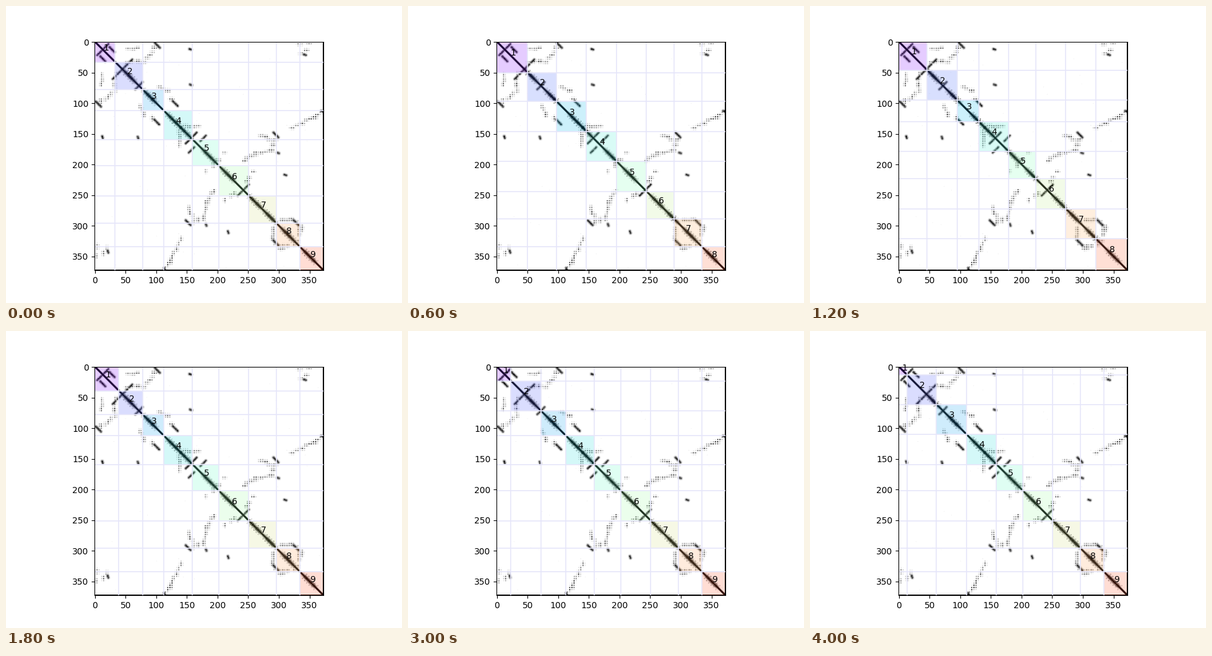
Recreate the animation shown at these times as a matplotlib script. Size 640 by 480 pixels, loop 4200 ms.

```python
import numpy as np
import matplotlib.pyplot as plt
from matplotlib.animation import FuncAnimation
from matplotlib.patches import Rectangle

SIZE = 373
FRAMES = 21
INTERVAL = 200
TAIL = [159, 202, 251, 296, 334]

# Domain boundaries at key steps
KEYS = {
    0: [33, 78, 112, *TAIL],
    3: [50, 97, 146, 195, 244, 289, 334],
    5: [46, 95, 130, 179, 223, 272, 321],
    9: [39, 78, 112, *TAIL],
    12: [26, 74, 112, *TAIL],
    17: [21, 70, 112, *TAIL],
    20: [13, 61, 110, *TAIL],
}

# Hairpins: center on the diagonal, inner and outer reach of the arm
HAIRPINS = [(13, 0, 9), (45, 0, 8), (45, 11, 16), (72, 0, 6),
            (157, 0, 9), (167, 5, 8), (167, 10, 14), (242, 0, 9)]
HELICES = [56, 90, 128, 145, 186, 217, 262, 285, 315, 350]
# Short strands running along the diagonal
PAIRS = [(28, 13), (102, 6), (131, 101), (295, 152), (328, 295)]
SPOTS = [(155, 12), (156, 70), (310, 217), (342, 21), (370, 113), (298, 181)]
# Trails of dotted clumps
TRAILS = [
    [(242, 194), (262, 183), (287, 178), (293, 161), (270, 152)],
    [(321, 140), (337, 134), (350, 126), (369, 114)],
    [(52, 33), (70, 32)],
    [(54, 12), (72, 10)],
    [(82, 32), (97, 9)],
    [(104, 74), (120, 80), (124, 94)],
    [(147, 137), (168, 138)],
    [(201, 193), (211, 182)],
    [(248, 229), (256, 213)],
    [(304, 291), (320, 289), (336, 300), (332, 325)],
    [(335, 4), (349, 3)],
    [(336, 19), (347, 14)],
]


def stroke(x0, y0, x1, y1, width):
    dx, dy = x1 - x0, y1 - y0
    length2 = max(dx * dx + dy * dy, 1e-9)
    t = np.clip(((X - x0) * dx + (Y - y0) * dy) / length2, 0, 1)
    gap = (X - x0 - t * dx) ** 2 + (Y - y0 - t * dy) ** 2
    return np.exp(-gap / width ** 2)


def along(trail, step):
    for (x0, y0), (x1, y1) in zip(trail, trail[1:]):
        count = max(2, round(np.hypot(x1 - x0, y1 - y0) / step))
        for t in np.linspace(0, 1, count):
            yield x0 + (x1 - x0) * t, y0 + (y1 - y0) * t


def contact_map():
    rng = np.random.default_rng(4)
    grain = rng.random((SIZE, SIZE))
    wave = lambda v: 0.5 + 0.5 * np.cos(2 * np.pi * v / 3.6)
    lattice = wave(X) * wave(Y)
    rough = 0.6 + 0.5 * grain
    layers = [(grain > 0.9995) * 0.08]
    for c, inner, outer in HAIRPINS:
        layers.append(rough * stroke(c + inner, c - inner, c + outer, c - outer, 1.8))
    for x, y in PAIRS:
        layers.append(rough * stroke(x - 4, y - 4, x + 4, y + 4, 2))
    for x, y in SPOTS:
        layers.append(rough * stroke(x - 1, y, x + 2, y + 1, 2))
    for trail in TRAILS:
        for x, y in along(trail, 6):
            x, y = (x, y) + rng.normal(0, 1, 2)
            clump = stroke(x - 2, y, x + 2, y, rng.uniform(2, 3.2))
            layers.append(clump * lattice * rng.uniform(0.7, 1.3))

    offset, middle = X - Y, (X + Y) / 2
    for c in HELICES:
        bulge = np.exp(-((middle - c) / 11) ** 4)
        core = np.exp(-(offset / 4.6) ** 4) * (0.4 + 0.7 * grain)
        fringe = np.exp(-((offset - 6.5) / 2) ** 2) * lattice * grain
        layers.append(bulge * np.maximum(core, fringe))
    layers.append(np.exp(-(offset / 2.3) ** 4) * 1.1)

    m = np.triu(np.max(layers, axis=0))
    m = np.maximum(m, m.T)
    m[m < 0.03] = 0
    m[-1, :] = m[:, -1] = 1
    return np.clip(m, 0, 1)


def boundaries(step):
    before = max(k for k in KEYS if k <= step)
    after = min(k for k in KEYS if k >= step)
    if before == after:
        return KEYS[step]
    a, b = KEYS[before], KEYS[after]
    t = (step - before) / (after - before)
    if len(a) != len(b):
        return a if t <= 0.5 else b
    return [round(p + (q - p) * t) for p, q in zip(a, b)]


Y, X = np.mgrid[:SIZE, :SIZE].astype(float)
fig, ax = plt.subplots(figsize=(6.4, 4.8), dpi=100)
ax.imshow(contact_map(), cmap="gray_r", vmin=0, vmax=1)
ax.set_autoscale_on(False)
overlay = []


def update(step):
    while overlay:
        overlay.pop().remove()
    cuts = boundaries(step)
    edges = [0, *cuts, SIZE - 1]
    count = len(edges) - 1
    for i, (a, b) in enumerate(zip(edges, edges[1:])):
        color = plt.cm.rainbow(i / count)
        box = Rectangle((a, a), b - a, b - a, fc=color, ec="none", alpha=0.2)
        overlay.append(ax.add_patch(box))
        at = a + 0.44 * (b - a)
        overlay.append(ax.text(at - 0.5, at, str(i + 1), color="black"))
    for c in cuts:
        overlay.append(ax.axvline(c, color="lavender", lw=1.2))
        overlay.append(ax.axhline(c, color="lavender", lw=1.2))
    return overlay


anim = FuncAnimation(fig, update, frames=FRAMES, interval=INTERVAL,
                     init_func=lambda: [], repeat=True, repeat_delay=0)
plt.show()
```
